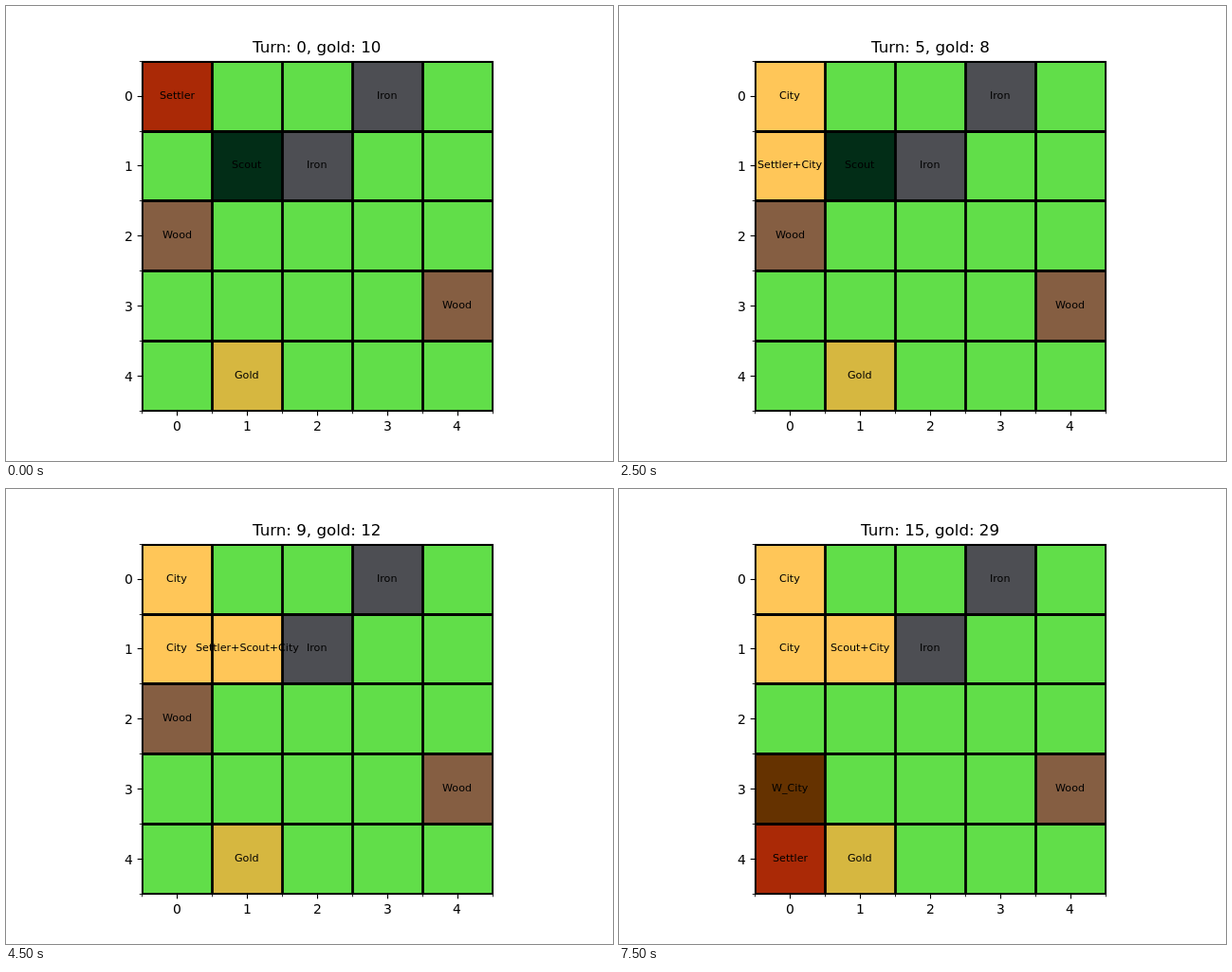
Write an HTML page with a canvas that moves like this. It is 640x480 px and loops after 8000 ms.

```html
<!DOCTYPE html>
<html>
<head>
<meta charset="utf-8">
<style>
html, body { margin: 0; width: 100%; height: 100%; overflow: hidden; background: #fff; }
canvas { display: block; }
</style>
</head>
<body>
<canvas id="stage" width="640" height="480"></canvas>
<script>
const ctx = document.getElementById('stage').getContext('2d');
const LEFT = 143.2, TOP = 57.6, CELL = 73.92, TURN_MS = 500;
const COLORS = {
  Grass: '#61de49', Iron: '#4d4e53', Wood: '#855e42', Gold: '#d6b740',
  Settler: '#aa2906', Scout: '#022d17', City: '#ffc658', W_City: '#653200'
};

// Cells are written as "column,row".
const resources = { '3,0': 'Iron', '2,1': 'Iron', '0,2': 'Wood', '4,3': 'Wood', '1,4': 'Gold' };
const cities = [
  { at: '0,0', turn: 1, kind: 'City' },
  { at: '0,1', turn: 3, kind: 'City' },
  { at: '1,1', turn: 9, kind: 'City' },
  { at: '0,3', turn: 13, kind: 'W_City' }
];
const settlerMoves = [[0, '0,0'], [2, '0,1'], [8, '1,1'], [10, '0,1'], [11, '0,2'], [12, '0,3'], [14, '0,4']];
const scoutMoves = [[0, '1,1'], [4, '1,2'], [5, '1,1'], [6, '1,0'], [7, '1,1']];
const gold = [10, 6, 7, 4, 6, 8, 10, 12, 14, 12, 15, 18, 21, 19, 24, 29];
const WOOD_CUT_TURN = 11;

const place = (moves, turn) => moves.filter(m => m[0] <= turn).pop()[1];
const snap = v => Math.round(v) + 0.5;
const colX = c => LEFT + c * CELL;
const rowY = r => TOP + r * CELL;

function contents(at, turn) {
  const items = [];
  if (place(settlerMoves, turn) === at) items.push('Settler');
  if (place(scoutMoves, turn) === at) items.push('Scout');
  for (const city of cities)
    if (city.at === at && city.turn <= turn) items.push(city.kind);
  const cut = at === '0,2' && turn >= WOOD_CUT_TURN;
  if (!items.length && resources[at] && !cut) items.push(resources[at]);
  return items;
}

function text(str, x, y, size, align = 0.5) {
  ctx.font = size + 'px "DejaVu Sans", sans-serif';
  ctx.fillText(str, Math.round(x - ctx.measureText(str).width * align), y);
}

function line(x1, y1, x2, y2, width) {
  ctx.lineWidth = width;
  ctx.beginPath();
  ctx.moveTo(x1, y1);
  ctx.lineTo(x2, y2);
  ctx.stroke();
}

function ticks(pos, length, width) {
  const x = snap(colX(pos)), y = snap(rowY(pos));
  line(x, 427.5, x, 427.5 + length, width);
  line(143.5 - length, y, 143.5, y, width);
}

function draw(turn) {
  ctx.fillStyle = '#fff';
  ctx.fillRect(0, 0, 640, 480);
  ctx.strokeStyle = '#000';
  const labels = [];

  ctx.save();
  ctx.beginPath();
  ctx.rect(143, 58, 371, 370);
  ctx.clip();
  for (let r = 0; r < 5; r++) {
    for (let c = 0; c < 5; c++) {
      const items = contents(c + ',' + r, turn);
      const x = snap(colX(c)), y = snap(rowY(r));
      ctx.fillStyle = COLORS[items[items.length - 1] || 'Grass'];
      ctx.fillRect(x, y, snap(colX(c + 1)) - x, snap(rowY(r + 1)) - y);
      if (items.length) labels.push([items.join('+'), c, r]);
    }
  }
  for (let i = 0; i <= 5; i++) {
    const x = snap(colX(i)), y = snap(rowY(i));
    line(x, 58, x, 428, 2.78);
    line(143, y, 514, y, 2.78);
  }
  ctx.restore();

  ctx.lineWidth = 1.11;
  ctx.strokeRect(143.5, 58.5, 370, 369);
  ctx.fillStyle = '#000';
  for (let i = 0; i <= 5; i++) ticks(i, 2.78, 0.83);
  for (let i = 0; i < 5; i++) {
    ticks(i + 0.5, 4.86, 1.11);
    text(i, colX(i + 0.5), 448, 13.89);
    text(i, 133.48, Math.round(rowY(i + 0.5) + 5.28), 13.89, 1);
  }
  for (const [str, c, r] of labels)
    text(str, colX(c + 0.5), Math.round(rowY(r + 0.5) + 3), 11.11);
  text(`Turn: ${turn}, gold: ${gold[turn]}`, 328, 49, 16.67);
}

const start = performance.now();
function frame() {
  const elapsed = performance.now() - start;
  draw(Math.floor(elapsed / TURN_MS) % gold.length);
  requestAnimationFrame(frame);
}
frame();
</script>
</body>
</html>
```
